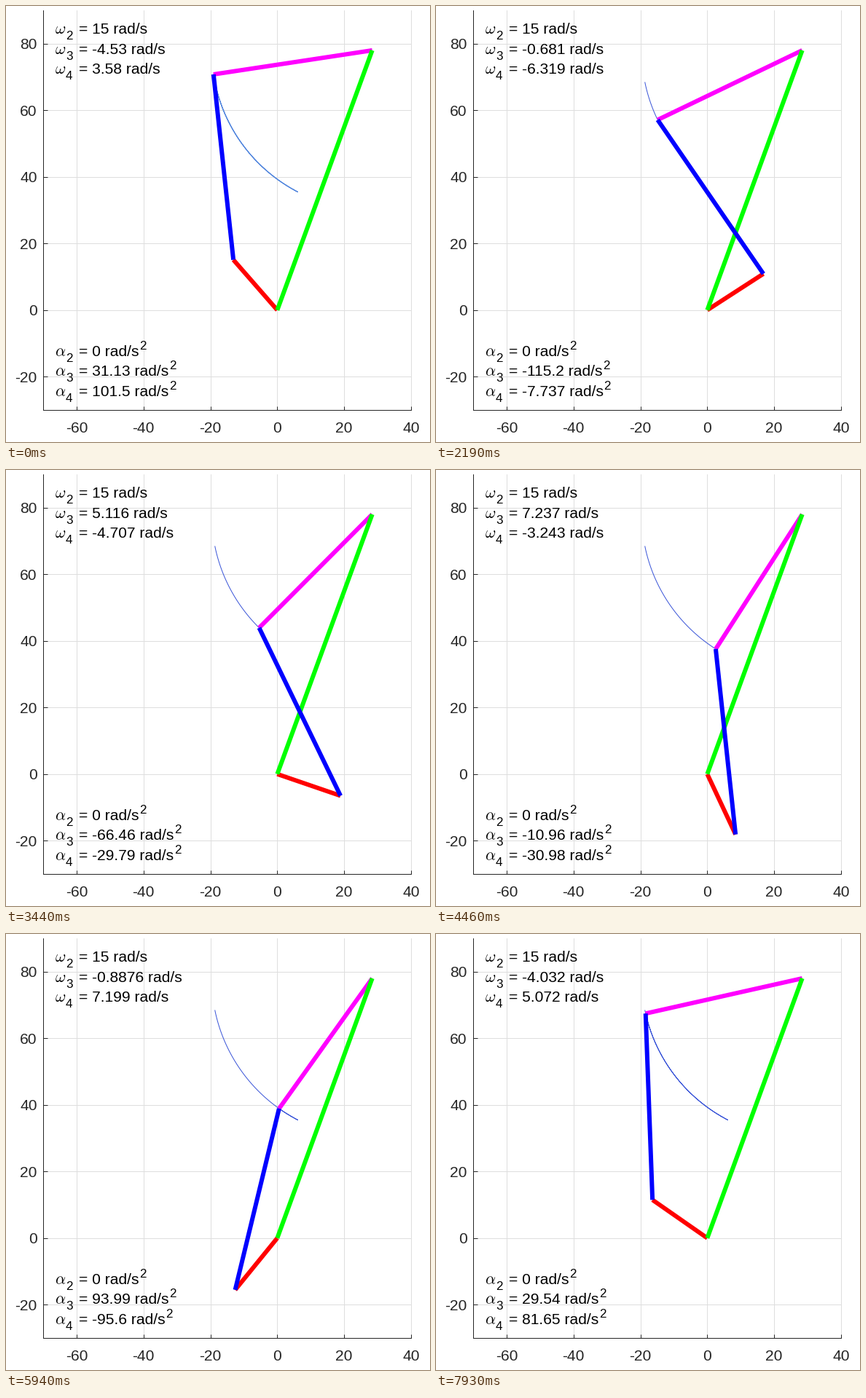
Animation, 582 px wide and 599 px high, one loop 7960 ms. Source, as a matplotlib script:

```python
import numpy as np
import matplotlib.pyplot as plt
from matplotlib.animation import FuncAnimation

W, H, DPI = 582, 599, 64
PX = 72 / DPI  # points per pixel
FRAMES, INTERVAL = 199, 40

plt.rcParams.update({
    "font.family": "Liberation Sans",
    "font.size": 21 * PX,
    "axes.unicode_minus": False,
})

# Four-bar linkage: crank, coupler, rocker and the fixed pivot
CRANK, COUPLER, ROCKER = 20, 56, 48
TILT = 70
PIVOT = 83 * np.exp(1j * np.radians(TILT))
OMEGA = 15
START, STEP = 61, 2

# The crank's pace varies slightly: steps taken by given moments
PACE_FRAMES = [0, 27, 54, 86, 111, 148, 198]
PACE_STEPS = [0, 25, 49, 75, 98, 130, 173]


def solve(deg):
    """Crank tip, rocker tip and the three link angles."""
    t2 = np.radians(deg + TILT)
    a = CRANK * np.exp(1j * t2)
    gap = PIVOT - a
    d = np.abs(gap)
    t3 = np.angle(gap) + np.arccos(
        (d**2 + COUPLER**2 - ROCKER**2) / (2 * d * COUPLER))
    b = a + COUPLER * np.exp(1j * t3)
    return a, b, t2, t3, np.angle(b - PIVOT)


def rates(t2, t3, t4):
    """Angular velocities and accelerations of coupler and rocker."""
    s = np.sin(t4 - t3)
    c = np.cos(t4 - t3)
    w3 = -CRANK * OMEGA * np.sin(t4 - t2) / (COUPLER * s)
    w4 = CRANK * OMEGA * np.sin(t2 - t3) / (ROCKER * s)
    n2, n3, n4 = CRANK * OMEGA**2, COUPLER * w3**2, ROCKER * w4**2
    a3 = (n2 * np.cos(t2 - t4) + n3 * c - n4) / (COUPLER * s)
    a4 = (n2 * np.cos(t2 - t3) + n3 - n4 * c) / (ROCKER * s)
    return w3, w4, a3, a4


fig = plt.figure(figsize=(W / DPI, H / DPI), dpi=DPI, facecolor="white")
ax = fig.add_axes([51 / W, 44 / H, 505 / W, 549 / H])
ax.set(xlim=(-70, 40), ylim=(-30, 90),
       xticks=range(-60, 41, 20), yticks=range(-20, 81, 20))
ax.set_axisbelow(True)
ax.grid(color="#dedede", lw=PX)
ax.tick_params(direction="in", length=5.5 * PX, width=PX,
               color="#262626", labelcolor="#262626")
ax.tick_params(axis="x", pad=15.5 * PX)
ax.tick_params(axis="y", pad=8.5 * PX)
ax.spines["top"].set_visible(False)
ax.spines["right"].set(color="#dedede", lw=PX, zorder=0.4)
for side in ("left", "bottom"):
    ax.spines[side].set(color="#262626", lw=PX)


def bar(color):
    return ax.plot([], [], color=color, lw=6 * PX,
                   solid_capstyle="butt")[0]


def label(x, y, text, size=21, **kw):
    return fig.text(x / W, 1 - y / H, text, fontsize=size * PX,
                    va="baseline", **kw)


def readout(symbol, index, y):
    label(67, y, rf"$\{symbol}$", 22, math_fontfamily="cm")
    label(82, y + 8, str(index), 17)
    return label(99.5, y, "")


trail, = ax.plot([], [])
crank, rocker, ground, coupler = map(bar, ("red", "magenta", "lime", "blue"))
ground.set_data([0, PIVOT.real], [0, PIVOT.imag])

speeds = [readout("omega", i, y) for i, y in zip((2, 3, 4), (38, 66, 93))]
accels = [readout("alpha", i, y) for i, y in zip((2, 3, 4), (481, 508, 536))]
for text in accels:
    ax.annotate("2", xy=(1, 0), xycoords=text, xytext=(1, 13),
                textcoords="offset pixels", fontsize=17 * PX,
                va="baseline", annotation_clip=False)


def link(line, p, q):
    line.set_data([p.real, q.real], [p.imag, q.imag])


def update(k):
    steps = round(float(np.interp(k, PACE_FRAMES, PACE_STEPS)))
    deg = (START - STEP * steps) % 360
    a, b, *angles = solve(deg)
    link(crank, 0j, a)
    link(coupler, a, b)
    link(rocker, b, PIVOT)

    # The traced path restarts after each full turn of the crank
    path = solve(np.arange(359, deg - 1, -STEP))[1]
    trail.set_data(path.real, path.imag)
    first = STEP * steps < START
    trail.set(color="#5588de" if first else "#3a55d8",
              lw=(1.2 if first else 1.0) * PX)

    w3, w4, a3, a4 = rates(*angles)
    for text, v in zip(speeds, (OMEGA, w3, w4)):
        text.set_text(f"= {v:.4g} rad/s")
    for text, v in zip(accels, (0, a3, a4)):
        text.set_text(f"= {v:.4g} rad/s")
    return [trail, crank, coupler, rocker, *speeds, *accels]


anim = FuncAnimation(fig, update, frames=FRAMES, interval=INTERVAL,
                     repeat=True, repeat_delay=0)
plt.show()
```
